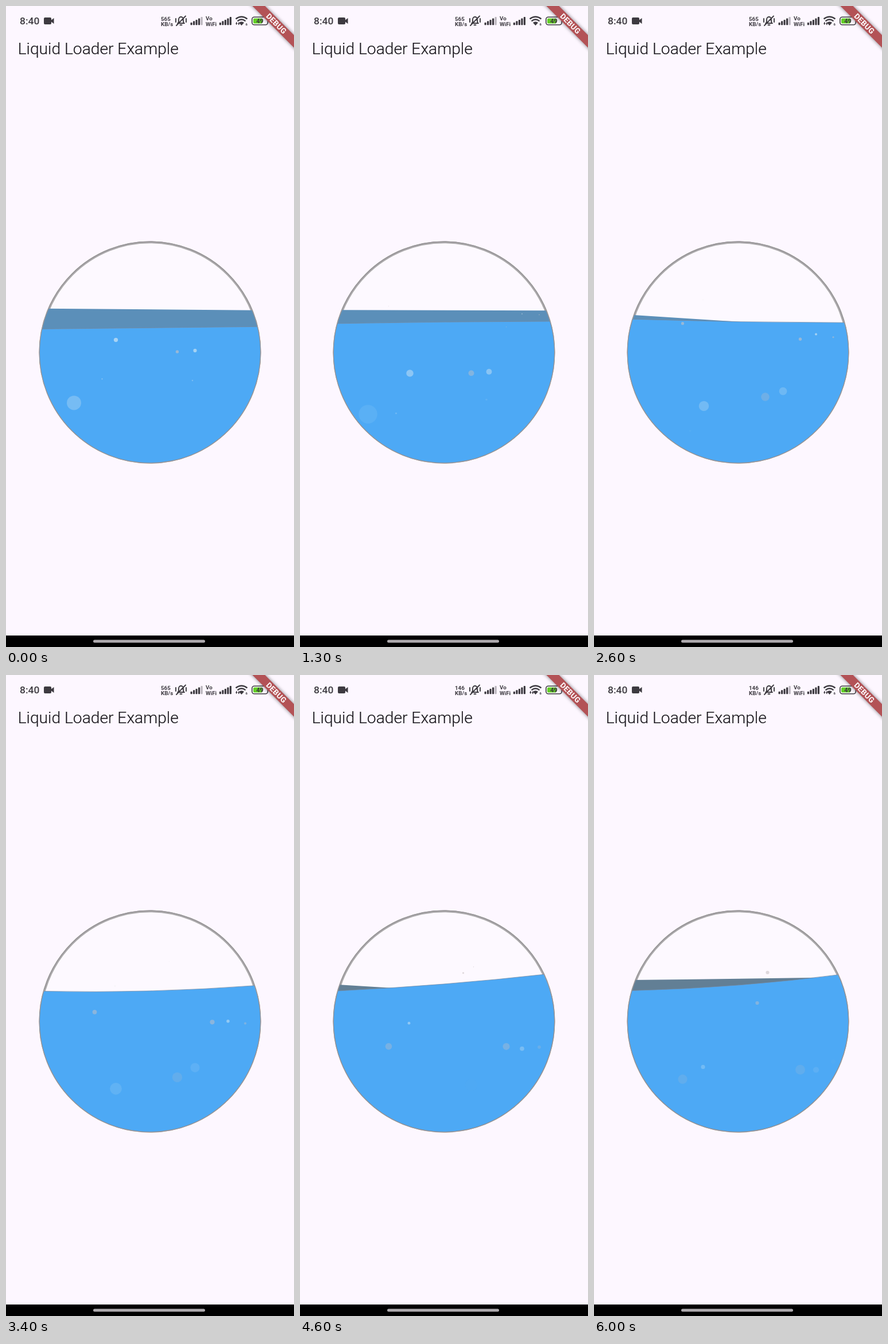
Animation, 502 px wide and 1116 px high, one loop 6.1 s. Source, as an HTML page:

```html
<!DOCTYPE html>
<html lang="en">
<head>
<meta charset="utf-8">
<title>Liquid loader</title>
<style>
html, body { margin: 0; width: 100%; height: 100%; overflow: hidden; background: #fdf7ff; }
svg { display: block; width: 100%; height: 100%; font-family: Roboto, sans-serif; }
.small { font-weight: 700; font-size: 9.8px; }
.line { fill: none; stroke: #3d3a40; }
</style>
</head>
<body>
<svg viewBox="0 0 502 1116">
  <defs>
    <clipPath id="bowl"><circle cx="251" cy="603" r="192"/></clipPath>
    <filter id="soft" x="-20%" y="-60%" width="140%" height="220%"><feGaussianBlur stdDeviation="3"/></filter>
  </defs>
  <rect width="502" height="1116" fill="#fdf7ff"/>

  <g fill="#3d3a40">
    <text x="24" y="32" font-size="17.4" font-weight="500">8:40</text>
    <path d="M68 20h9q2 0 2 2v2.500l4.500-3.500v10l-4.500-3.500v2.500q0 2-2 2h-9q-2 0-2-2v-8q0-2 2-2z"/>
    <text id="speed" class="small" x="270" y="26"></text>
    <text class="small" x="270" y="34.500" font-size="9">KB/s</text>
    <path class="line" stroke-width="1.900" stroke-linecap="round" d="M299.500 30h11l-1.500-2.500v-4c0-6-8-6-8 0v4zM303.500 33h3M297 34l16-16.500M296 22v6M314 22v6"/>
    <g id="bars"></g>
    <text class="small" x="348" y="25">Vo</text>
    <text class="small" x="348" y="34.500">WiFi</text>
    <path class="line" stroke-width="2.300" d="M400.500 22.500q10-7.500 20 0M403.500 26.300q7-5.500 14 0"/>
    <path d="M406 29q4.500-3.500 9 0l-4.500 5z"/>
    <path id="arrows" d="M400 30h1v-2h1.500v2h1l-1.750 3zM404 31l1.750-3 1.750 3h-1v2h-1.500v-2z"/>
    <text x="417.500" y="33.500" font-size="6" font-weight="700">6</text>
    <rect class="line" x="428.800" y="19.200" width="27.500" height="13.600" rx="4" stroke-width="1.600"/>
    <path d="M458 23.500q2 2.500 0 5z"/>
    <rect x="431" y="21.400" width="16" height="9.200" rx="2" fill="#62cf25"/>
    <text x="442.500" y="30" font-size="11" font-weight="700" text-anchor="middle">49</text>
  </g>

  <g transform="translate(502 0) rotate(45)">
    <rect x="-60" y="35.800" width="120" height="15.400" opacity=".5" filter="url(#soft)"/>
    <rect x="-60" y="35.800" width="120" height="15.400" fill="#b35256"/>
    <text y="48.100" font-size="13.200" font-weight="700" letter-spacing=".4" fill="#fff" text-anchor="middle">DEBUG</text>
  </g>

  <text x="20.700" y="84" font-size="28.200" font-weight="300" fill="#1a181d" stroke="#1a181d" stroke-width=".2">Liquid Loader Example</text>

  <circle cx="251" cy="603" r="191.600" fill="#fdf9ff" stroke="#aba9ab" stroke-width="3.800"/>
  <circle cx="251" cy="603" r="192.800" fill="none" stroke="#969496" stroke-width="1.400"/>
  <g clip-path="url(#bowl)">
    <path id="back"/>
    <path id="front" fill="#4da9f5" stroke="#77879a" stroke-opacity=".7"/>
  </g>
  <g id="bubbles"></g>

  <rect y="1096" width="502" height="20"/>
  <rect x="152" y="1103.500" width="195" height="5" rx="2.500" fill="#aeaaae"/>
</svg>
<script>
const LOOP = 6100;
const LIFE = 6.2;
const $ = id => document.getElementById(id);
const clamp = v => Math.min(Math.max(v, 0), 1);
const lerp = (a, b, u) => a + (b - a) * u;
const easeInOut = p => (1 - Math.cos(Math.PI * p)) / 2;

function add(parent, tag, attrs) {
  const el = document.createElementNS('http://www.w3.org/2000/svg', tag);
  set(el, attrs);
  return parent.appendChild(el);
}

function set(el, attrs) {
  for (const name in attrs) el.setAttribute(name, attrs[name]);
}

function addSignal(left, strength) {
  for (let i = 0; i < 5; i++) {
    const height = 4.5 + i * 2.4;
    add($('bars'), 'rect', {
      x: left + i * 4.5, y: 33.2 - height, width: 3.2, height, rx: 1,
      opacity: i < strength ? 1 : .35
    });
  }
}
addSignal(321.5, 4);
addSignal(371.8, 5);

// Sway of each surface at a few moments: height at the centre, tilt and bend
const moments = [0, .8, 1.9, 2.6, 3.4, 4.6, 6];
const front = {
  level: [560.3, 555.5, 545, 549.6, 550, 538, 540],
  tilt: [-2, -2.5, -.5, 3, -5, -15, -14.5],
  bend: [0, -1, 2.5, -1.4, -4.5, -3, -5]
};
const back = {
  level: [528.2, 532.2, 529, 549.7, 558, 550.5, 528.7],
  tilt: [1.5, -1.2, 4.3, 12, 6, 11.5, -2.4]
};

function slope(v, i) {
  const a = Math.max(i - 1, 0), b = Math.min(i + 1, v.length - 1);
  return (v[b] - v[a]) / (moments[b] - moments[a]);
}

// Smooth curve through the values at the moments
function sample(v, t) {
  let i = 0;
  while (i < moments.length - 2 && t >= moments[i + 1]) i++;
  const span = moments[i + 1] - moments[i];
  const u = clamp((t - moments[i]) / span), w = 1 - u;
  return w * w * (1 + 2 * u) * v[i] + u * u * (3 - 2 * u) * v[i + 1]
    + span * u * w * (w * slope(v, i) - u * slope(v, i + 1));
}

function surfacePath({ level, tilt, bend }, t) {
  const y = sample(level, t), k = sample(tilt, t), c = bend ? sample(bend, t) : 0;
  return `M50 ${y - k + c}H65Q251 ${y - c} 437 ${y + k + c}H452V810H50Z`;
}

function backColor(t) {
  const u = clamp((t - 2.6) / 2);
  return `rgb(${lerp(91, 98, u)},${lerp(143, 127, u)},${lerp(185, 149, u)})`;
}

// Sinking bubbles, by turns pale and grey: x, birth, top, travel, final radius
const bubbles = [
  [191.5, -1.85, 543, 188, 12.2],
  [298.5, -1.5, 584, 130, 11],
  [329.5, -2.05, 571.2, 116.5, 9.2],
  [359.5, 1, 558, 142, 10.5],
  [387, .5, 529.5, 163, 5.8],
  [417, .1, 524, 150, 4],
  [167.5, -3.3, 537, 204, 2],
  [154.5, 1, 521.6, 200, 10],
  [325, -4.1, 538.4, 153, 2],
  [284.5, 3.2, 498, 172, 6.8],
  [118.5, -4.3, 610, 103, 18],
  [302.5, 4.2, 507.5, 54, 10.5],
  [190, 1.6, 497, 230, 5]
].map(([cx, birth, top, travel, size], i) => {
  const dot = add($('bubbles'), 'circle', { cx, fill: i % 2 ? '#c9c2c4' : '#f1f5f2' });
  return t => {
    const p = clamp((t - birth) / LIFE);
    set(dot, { cy: top + travel * easeInOut(p), r: size * p, opacity: .8 * (1 - p) });
  };
});

// The picture advances ten times a second and pauses twice
function stepTime(ms) {
  const step = Math.floor(ms / 100) / 10;
  if (step > 2.6 && step < 3) return 2.6;
  if (step > 4.8 && step < 5) return 4.8;
  return step;
}

function draw(ms) {
  const t = stepTime(ms % LOOP);
  set($('front'), { d: surfacePath(front, t) });
  set($('back'), { d: surfacePath(back, t), fill: backColor(t) });
  bubbles.forEach(move => move(t));
  $('speed').textContent = t < 3.9 ? '565' : '146';
  set($('arrows'), { opacity: t >= .7 && t < 2.3 ? 0 : 1 });
}

const begin = performance.now();
function tick() {
  draw(performance.now() - begin);
  requestAnimationFrame(tick);
}
tick();
</script>
</body>
</html>
```
